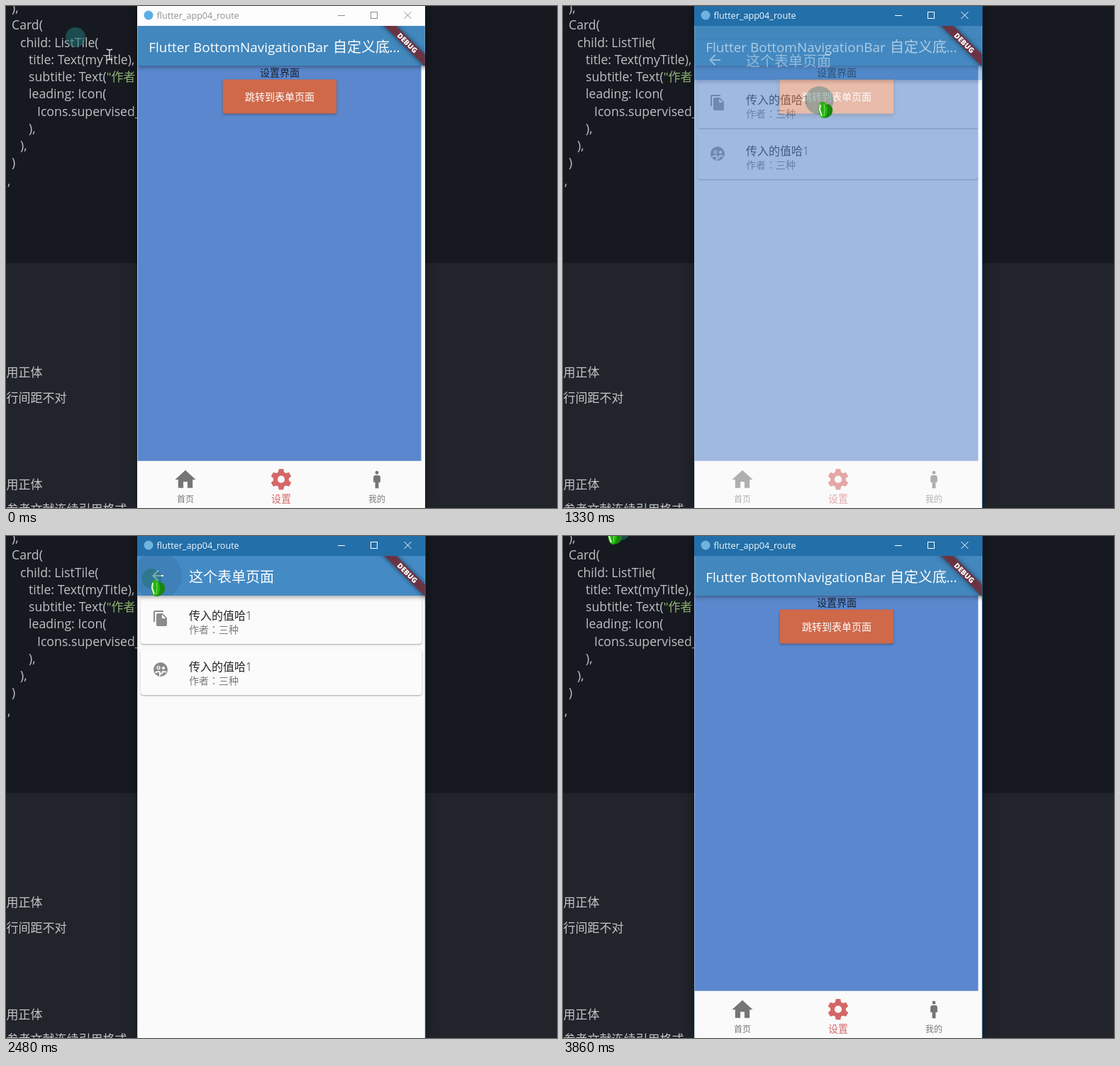
An HTML page with a canvas that plays this animation: 777 by 707 pixels, repeating every 4.13 s.

```html
<!DOCTYPE html>
<html lang="zh-CN">
<head>
<meta charset="utf-8">
<style>
html, body { margin: 0; width: 777px; height: 707px; overflow: hidden; background: #161920; }
canvas { display: block; }
</style>
</head>
<body>
<canvas id="stage" width="777" height="707"></canvas>
<script>
const W = 777, H = 707, LOOP = 4130;
const TICKS = [0, 200, 470, 750, 1030, 1330, 1640, 1920, 2200, 2480, 2750, 3010, 3280, 3560, 3860];
const FONT = '"Open Sans", "Noto Sans CJK SC", "Noto Sans CJK", sans-serif';
const FONT_TC = '"Noto Sans CJK TC", "Noto Sans CJK", sans-serif';
const LEFT = 185, RIGHT = 591, TITLE_H = 28;

// Pointer path: time, x, y
const PATH = [[0, 146, 68], [200, 215, 88], [470, 318, 120], [750, 361, 133], [1640, 361, 133],
  [1920, 300, 108], [2200, 213, 65], [2480, 205, 60], [3010, 205, 60], [3280, 165, 38], [3560, 84, 2], [3860, 64, -13]];
const PRESSES = [[1030, 1640], [2480, 3010], [3860, LOOP]];

const ICONS = {
  home: new Path2D('M10 20v-6h4v6h5v-8h3L12 3 2 12h3v8z'),
  man: new Path2D('M14 7h-4c-1.1 0-2 .9-2 2v6h2v7h4v-7h2V9c0-1.1-.9-2-2-2zM14 4a2 2 0 1 1-4 0a2 2 0 1 1 4 0z'),
  back: new Path2D('M20 11H7.83l5.59-5.59L12 4l-8 8 8 8 1.41-1.41L7.83 13H20z'),
  copy: new Path2D('M16 1H4c-1.1 0-2 .9-2 2v14h2V3h12zm-1 4l6 6v10c0 1.1-.9 2-2 2H8c-1.1 0-2-.9-2-2V7c0-1.1.9-2 2-2zm-1 7h5.5L14 6.5z'),
  arrow: new Path2D('M0 0L17 15L12 16L16 22L10 26L7 19L1 23z'),
  leaf: new Path2D('M2 3C7-1 12 5 12 13C12 20 10 24 6 25C0 24-3 12 2 3z'),
  leafBack: new Path2D('M8 7C13 3 17 6 19 11C20 18 17 24 7 25z')
};

const screen = document.getElementById('stage').getContext('2d');
const formLayer = document.createElement('canvas');
formLayer.width = W;
formLayer.height = H;
const formCtx = formLayer.getContext('2d');

const clamp = v => Math.max(0, Math.min(1, v));
const smooth = v => v * v * (3 - 2 * v);

function rect(c, x, y, w, h, color) {
  c.fillStyle = color;
  c.fillRect(x, y, w, h);
}

function disc(c, x, y, r, color) {
  c.fillStyle = color;
  c.beginPath();
  c.arc(x, y, r, 0, Math.PI * 2);
  c.fill();
}

function line(c, color, width, ...points) {
  c.strokeStyle = color;
  c.lineWidth = width;
  c.beginPath();
  points.forEach(([x, y], i) => i ? c.lineTo(x, y) : c.moveTo(x, y));
  c.stroke();
}

// y is the visual middle of the text
function text(c, str, x, y, size, color, { align = 'left', weight = 400, font = FONT } = {}) {
  c.font = `${weight} ${size}px ${font}`;
  c.textAlign = align;
  c.fillStyle = color;
  c.fillText(str, x, y + size * 0.37);
}

function icon(c, path, x, y, scale, color) {
  c.save();
  c.translate(x, y);
  c.scale(scale, scale);
  c.fillStyle = color;
  c.fill(path);
  c.restore();
}

function withShadow(c, blur, dy, alpha, draw) {
  c.save();
  c.shadowColor = `rgba(0,0,0,${alpha})`;
  c.shadowBlur = blur;
  c.shadowOffsetY = dy;
  draw();
  c.restore();
}

function roundBox(c, x, y, w, h, r, color) {
  c.fillStyle = color;
  c.beginPath();
  c.roundRect(x, y, w, h, r);
  c.fill();
}

function gear(c, x, y, scale, color) {
  c.save();
  c.translate(x, y);
  c.scale(scale, scale);
  c.beginPath();
  for (let i = 0; i < 6; i++) {
    const a = i * Math.PI / 3;
    for (const [u, v] of [[-2.87, -6.93], [-2.2, -10], [2.2, -10], [2.87, -6.93]]) {
      c.lineTo(u * Math.cos(a) - v * Math.sin(a), u * Math.sin(a) + v * Math.cos(a));
    }
  }
  c.closePath();
  c.moveTo(3.5, 0);
  c.arc(0, 0, 3.5, 0, Math.PI * 2);
  c.fillStyle = color;
  c.fill('evenodd');
  c.restore();
}

function editor(c) {
  rect(c, 0, 0, W, 362, '#161920');
  rect(c, 0, 362, W, H - 362, '#21242b');
  const ink = '#bec0c4', size = 17.7;
  const lines = [[8, '),'], [8, 'Card('], [20, 'child: ListTile('], [32, 'title: Text(myTitle),'],
    [32, 'subtitle: Text('], [32, 'leading: Icon('], [44, 'Icons.supervised_'], [32, '),'], [20, '),'], [8, ')']];
  lines.forEach(([x, str], i) => text(c, str, x, 2.5 + i * 24.25, size, ink));
  c.font = `${size}px ${FONT}`;
  text(c, '"作者', 32 + c.measureText('subtitle: Text(').width, 99.5, 17, '#8fb573');
  text(c, ',', 2, 246, size, ink);
  const notes = [['用正体', 515.5], ['行间距不对', 551.5], ['用正体', 673.5], ['参考文献连续引用格式', 709]];
  notes.forEach(([str, y]) => text(c, str, 0.5, y, 17, '#c4c5c8'));
}

function titleBar(c, active) {
  const ink = active ? '#ffffff' : '#8d8d8d';
  rect(c, LEFT, 0, RIGHT - LEFT, TITLE_H, active ? '#236fa9' : '#fdfdfd');
  disc(c, 201, 13, 6.5, active ? '#6fb4e0' : '#5aaee5');
  text(c, 'flutter_app04_route', 212.5, 13, 12.6, active ? '#f4f8fb' : '#929292');
  line(c, ink, 1, [468, 13.5], [478, 13.5]);
  c.strokeRect(514.5, 8.5, 9, 9);
  line(c, ink, 1, [561.5, 8], [571.5, 18]);
  line(c, ink, 1, [571.5, 8], [561.5, 18]);
}

function appBar(c, color) {
  withShadow(c, 6, 2, 0.36, () => rect(c, LEFT, TITLE_H, RIGHT - LEFT, 56, color));
}

function settingsPage(c, t) {
  const centered = { align: 'center' };
  rect(c, LEFT, TITLE_H, RIGHT - LEFT, H, '#fafafa');
  rect(c, LEFT, 84, 400.5, 556.7, '#5a87cd');
  appBar(c, '#4287bd');
  text(c, 'Flutter BottomNavigationBar', 201.3, 58, 18.9, '#fff');
  text(c, '自定义底', 461, 57.5, 20, '#fff');
  text(c, '...', 540.5, 58, 18.9, '#fff');
  text(c, '设置界面', 386, 93.7, 14, '#16202f', { align: 'center', weight: 300 });

  const pressed = t >= 1030 && t < 1640;
  withShadow(c, pressed ? 6 : 3, pressed ? 3 : 1.5, 0.3,
    () => roundBox(c, 305.7, 103.5, 160.3, 48, 2, pressed ? '#d37556' : '#cf694a'));
  if (pressed) {
    c.save();
    c.beginPath();
    c.roundRect(305.7, 103.5, 160.3, 48, 2);
    c.clip();
    disc(c, 361, 133, 26 + (t - 1030) * 0.35, 'rgba(255,255,255,.14)');
    c.restore();
  }
  text(c, '跳转到表单页面', 386, 127.5, 14, '#fff', centered);

  const grey = '#757575', red = '#d46767';
  icon(c, ICONS.home, 235.5, 649.5, 1.458, grey);
  gear(c, 388, 666.7, 1.458, red);
  icon(c, ICONS.man, 508.4, 652.4, 1.22, grey);
  text(c, '首页', 253, 695, 12, '#7c7c7c', { align: 'center', weight: 300 });
  text(c, '设置', 388, 693.7, 14, red, centered);
  text(c, '我的', 523, 695, 12, '#7c7c7c', { align: 'center', weight: 300 });
}

function card(c, y) {
  withShadow(c, 2, 1, 0.35, () => roundBox(c, 190, y, 396.5, 64, 4, '#fbfbfb'));
  text(c, '传入的值哈1', 258, y + 24, 16, '#222', { weight: 300 });
  text(c, '作者：三种', 258, y + 44, 14, '#7c7c7c', { weight: 300, font: FONT_TC });
}

function formPage(c, t) {
  rect(c, LEFT, TITLE_H, RIGHT - LEFT, H, '#fafafa');
  card(c, 88);
  card(c, 160);
  icon(c, ICONS.copy, 206, 104, 1, '#8b8b8b');
  disc(c, 218, 188, 10, '#8b8b8b');
  disc(c, 215, 185.5, 2.6, '#fbfbfb');
  disc(c, 222, 186, 2.1, '#fbfbfb');
  disc(c, 215, 185.5, 1.2, '#8b8b8b');
  line(c, '#fbfbfb', 2, [210.5, 192.5], [215, 190.5], [217, 191.5], [217, 197]);
  line(c, '#fbfbfb', 2, [219, 195], [221, 191], [226, 191.5]);
  appBar(c, '#448bc5');
  if (t >= 2480) {
    c.save();
    c.beginPath();
    c.rect(LEFT, TITLE_H, RIGHT - LEFT, 56);
    c.clip();
    disc(c, 214, 56, 34, 'rgba(40,60,100,.13)');
    c.restore();
  }
  icon(c, ICONS.back, 202, 44, 1, '#fff');
  text(c, '这个表单页面', 258, 57.5, 20, '#fff');
}

function debugBanner(c) {
  c.save();
  c.translate(590, TITLE_H);
  c.rotate(Math.PI / 4);
  withShadow(c, 7, 0, 0.6, () => rect(c, -60, 28, 120, 12, 'rgba(112,50,66,.92)'));
  text(c, 'DEBUG', 0, 34, 10.2, '#fff', { align: 'center', weight: 800 });
  c.restore();
}

function appWindow(c, t) {
  const active = t >= 1030;
  // The form page fades in while rising, then leaves the same way.
  const shown = clamp((t - 1160) / 300) - clamp((t - 2620) / 300);
  withShadow(c, 16, 2, 0.4, () => rect(c, LEFT, 0, RIGHT - LEFT, H, '#fafafa'));
  if (active) rect(c, LEFT, 0, RIGHT - LEFT + 1, H, 'rgba(35,111,169,.6)');
  c.save();
  c.beginPath();
  c.rect(LEFT, 0, RIGHT - LEFT, H);
  c.clip();
  titleBar(c, active);
  c.beginPath();
  c.rect(LEFT + 0.5, TITLE_H, RIGHT - LEFT - 0.8, H);
  c.clip();
  if (shown < 1) settingsPage(c, t);
  if (shown > 0) {
    formCtx.clearRect(0, 0, W, H);
    formPage(formCtx, t);
    c.globalAlpha = shown ** 1.45;
    c.drawImage(formLayer, 0, Math.round(170 * (1 - shown) ** 2.55));
    c.globalAlpha = 1;
  }
  debugBanner(c);
  c.restore();
}

function pointerAt(t) {
  const i = PATH.findIndex(p => p[0] > t);
  if (i < 0) return PATH[PATH.length - 1].slice(1);
  const [t0, x0, y0] = PATH[i - 1], [t1, x1, y1] = PATH[i];
  const k = smooth((t - t0) / (t1 - t0));
  return [x0 + (x1 - x0) * k, y0 + (y1 - y0) * k];
}

function pointer(c, t) {
  const [x, y] = pointerAt(t);
  const press = PRESSES.find(([a, b]) => t >= a && t < b);
  const halo = (hx, hy, age) =>
    disc(c, hx, hy, 14 + age * 0.02, `rgba(32,112,115,${0.58 - age * 0.0007})`);
  if (t < 200) halo(98, 44, 0);
  if (press) {
    if (t >= 3860) halo(81, -8, 0);
    else halo(x + 0.5, y, t - press[0]);
    icon(c, ICONS.leafBack, x, y, 1, '#178511');
    icon(c, ICONS.leaf, x, y, 1, '#25b30c');
    line(c, '#e9fbe4', 2, [x + 2, y + 6], [x + 1, y + 13], [x + 4, y + 22]);
    line(c, '#7fe46c', 1, [x + 7, y + 5], [x + 8, y + 13], [x + 7, y + 22]);
  } else if (x < LEFT) {
    line(c, '#e4e4e4', 1.3, [x - 4, y - 7], [x, y - 6], [x + 4, y - 7]);
    line(c, '#e4e4e4', 1.3, [x, y - 6], [x, y + 7]);
    line(c, '#e4e4e4', 1.3, [x - 4, y + 8], [x, y + 7], [x + 4, y + 8]);
  } else {
    icon(c, ICONS.arrow, x, y, 1, '#2fca1c');
    c.save();
    c.translate(x, y);
    c.strokeStyle = '#1f9a17';
    c.lineWidth = 1;
    c.stroke(ICONS.arrow);
    c.restore();
    line(c, '#f2fff0', 2, [x + 2, y + 4], [x + 2, y + 18]);
  }
}

function frame(now) {
  const time = now % LOOP;
  const t = TICKS.findLast(tick => tick <= time);
  editor(screen);
  appWindow(screen, t);
  pointer(screen, t);
  requestAnimationFrame(frame);
}
requestAnimationFrame(frame);
</script>
</body>
</html>
```
